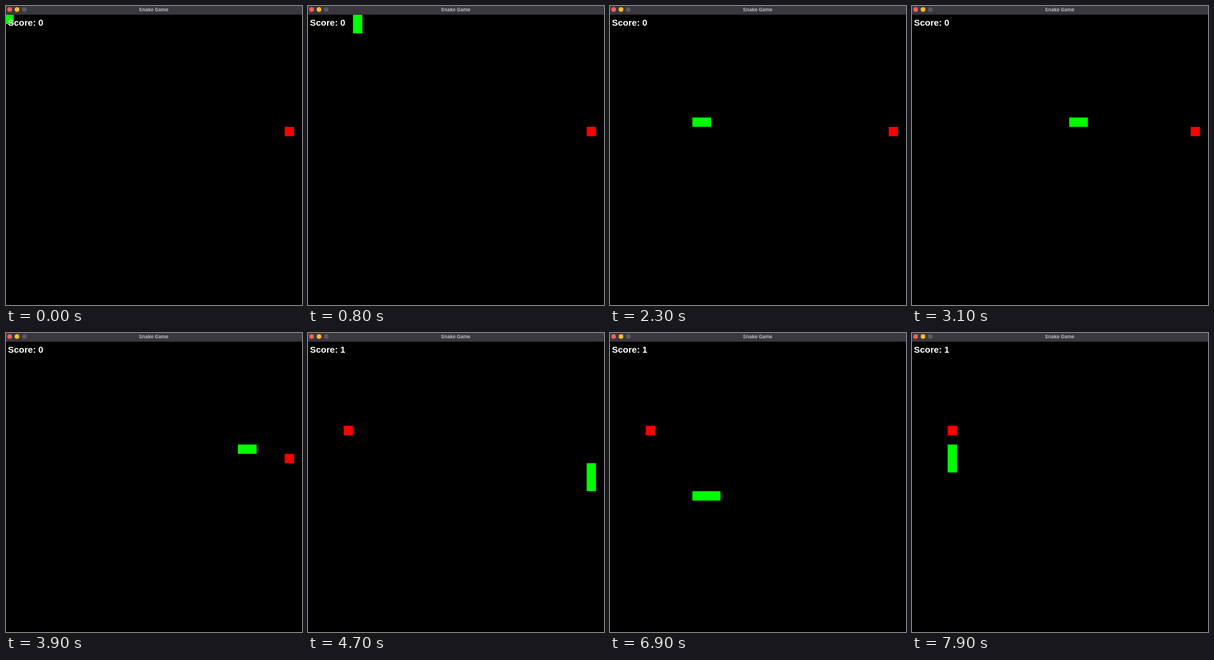
These frames come from a looping animation (495 by 500 pixels, 8000 ms). An HTML page with a canvas:

```html
<!DOCTYPE html>
<html lang="en">
<head>
<meta charset="utf-8">
<title>Snake Game</title>
<style>
html, body { margin: 0; width: 100%; height: 100%; overflow: hidden; background: #000; }
canvas { display: block; }
</style>
</head>
<body>
<canvas id="stage" width="495" height="500"></canvas>
<script>
const ctx = document.getElementById('stage').getContext('2d');
const LOOP = 8000, STEP = 100, IDLE_STEPS = 2;
const CELL = 15.63, LEFT = -2.9, TOP = 14.5;
const turns = [[0, 0], [5, 0], [5, 11], [30, 11], [30, 16], [4, 16], [4, 11]];
const foods = [[30, 12], [4, 9]];

// Every grid cell the head visits, in order
const path = [turns[0]];
for (const [tx, ty] of turns.slice(1)) {
  let [x, y] = path[path.length - 1];
  while (x !== tx || y !== ty) {
    x += Math.sign(tx - x);
    y += Math.sign(ty - y);
    path.push([x, y]);
  }
}
const eatStep = path.findIndex(([x, y]) => x === foods[0][0] && y === foods[0][1]);

function cells(list, color) {
  ctx.fillStyle = color;
  ctx.beginPath();
  for (const [x, y] of list) ctx.rect(LEFT + x * CELL, TOP + y * CELL, CELL, CELL);
  ctx.fill();
}

function text(str, x, y, font, color, align) {
  ctx.font = `bold ${font}, sans-serif`;
  ctx.textAlign = align;
  ctx.fillStyle = color;
  ctx.fillText(str, x, y);
}

function titleBar() {
  ctx.fillStyle = '#3a383e';
  ctx.fillRect(0, 0, 495, 14.5);
  ['#ff5f57', '#febc2e', '#5d5b60'].forEach((color, i) => {
    ctx.fillStyle = color;
    ctx.beginPath();
    ctx.arc(6.1 + i * 12.3, 5.8, 3.9, 0, Math.PI * 2);
    ctx.fill();
  });
  text('Snake Game', 247, 8.7, '8.1px Inter', '#b6b5b8', 'center');
}

function draw(now) {
  const step = Math.max(0, Math.floor((now % LOOP) / STEP) - IDLE_STEPS);
  const score = step >= eatStep ? 1 : 0;
  const length = 2 + score;

  ctx.fillStyle = '#000';
  ctx.fillRect(0, 0, 495, 500);
  cells([foods[score]], '#f00');
  cells(path.slice(Math.max(0, step - length + 1), step + 1), '#0f0');
  titleBar();
  text('Score: ' + score, 3.2, 33, '15px "Liberation Sans"', '#fff', 'left');
}

let start;
function tick(now) {
  start ??= now;
  draw(now - start);
  requestAnimationFrame(tick);
}
draw(0);
requestAnimationFrame(tick);
</script>
</body>
</html>
```
